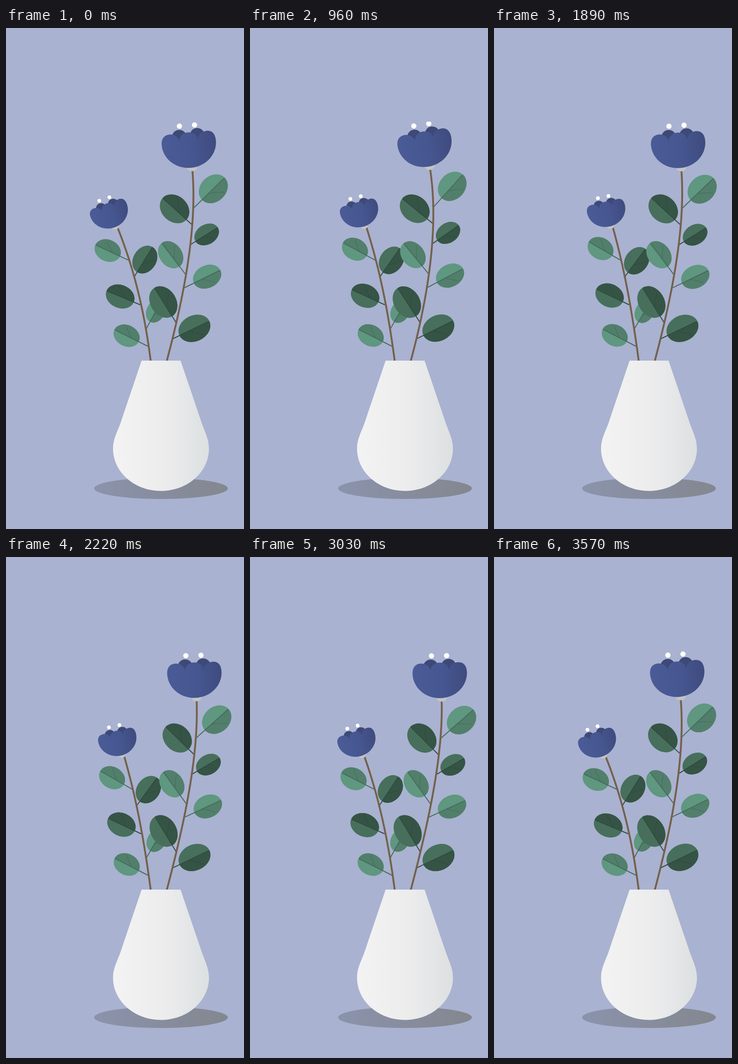
Recreate the animation shown at these times as an HTML page. Size 516x1086 px, loop 3600 ms.

```html
<!DOCTYPE html>
<html lang="en">
<head>
<meta charset="utf-8">
<title>Flowers in a vase</title>
<style>
html, body { margin: 0; height: 100%; overflow: hidden; background: #a9b2d0; }
svg { display: block; width: 100vw; height: 100vh; }
</style>
</head>
<body>
<svg viewBox="0 0 516 1086">
  <defs>
    <linearGradient id="petal"><stop stop-color="#4a5b97"/><stop offset=".55" stop-color="#465690"/><stop offset="1" stop-color="#3f4b7f"/></linearGradient>
    <linearGradient id="vase"><stop stop-color="#f3f3f4"/><stop offset=".55" stop-color="#ececed"/><stop offset="1" stop-color="#dce0e1"/></linearGradient>
    <linearGradient id="shade"><stop stop-color="#8b93ac"/><stop offset="1" stop-color="#83878f"/></linearGradient>
    <clipPath id="crop"><path d="M0 203H516V1086H0Z"/></clipPath>
  </defs>
  <ellipse cx="336" cy="998" rx="145" ry="23" fill="url(#shade)"/>
  <g id="left"></g>
  <g id="right" clip-path="url(#crop)"></g>
  <path fill="url(#vase)" d="M294 721H378.5L425 858C434 882 440 893 440 912C440 962 394 1003.5 336 1003.5S232 962 232 912C232 893 239 880 247 860Z"/>
</svg>
<script>
const LOOP = 3600, BEND_Y = 700;
const tones = {
  light: { base: '#5f9780', half: '#527f6b', rib: '#426d5a' },
  dark: { base: '#476f5c', half: '#355445', rib: '#2f4c3e' }
};

// Leaves: centre x, y, stalk foot x, y, half length, half width, tone
const branches = [
  {
    id: 'left', foot: 314, lean: -.19,
    stem: [[314, 724], [301, 620], [279, 525], [242, 433]],
    flower: { x: 226.3, y: 406.4, tilt: -19, size: .71 },
    leaves: [
      [325, 613, 303, 654, 27, 20, 'light'],
      [261.5, 667, 308, 690, 29.5, 23, 'light'],
      [247.5, 582, 291, 600, 32, 25, 'dark'],
      [301, 502, 277, 541, 32, 25, 'dark'],
      [220.5, 482.5, 267, 504, 29.5, 23.5, 'light']
    ],
    // steady at the outer end, eased at the inner one
    bend(t) {
      const p = 1 - Math.abs(1 - 2 * t);
      return 2.17e-4 * (p + p * p - p * p * p);
    }
  },
  {
    id: 'right', foot: 348, lean: .03,
    stem: [[348, 724], [381, 600], [416, 440], [404, 306]],
    flower: { x: 397.5, y: 264.7, tilt: -4.4, size: 1 },
    leaves: [
      [408.5, 651, 361, 674, 36, 28, 'dark'],
      [341, 594, 369, 639, 36.5, 28, 'dark'],
      [436, 539, 387, 563, 32, 24.5, 'light'],
      [357, 491.5, 390, 535, 32, 24.5, 'light'],
      [435, 447.5, 401, 469, 28.5, 21.5, 'dark'],
      [365.5, 392, 404, 427, 35, 28, 'dark'],
      [449.5, 348.5, 406, 391, 34.5, 28, 'light']
    ],
    bend: t => -8.9e-5 * Math.sin(2 * Math.PI * t)
  }
];

function leafSvg([x, y, fx, fy, a, b, tone]) {
  const { base, half, rib } = tones[tone];
  const stalk = Math.hypot(x - fx, y - fy);
  return `<g><ellipse rx="${a}" ry="${b}" fill="${base}"/>
    <path d="M${-a} 0A${a} ${b} 0 0 0 ${a} 0Z" fill="${half}"/>
    <g stroke="${rib}" fill="none"><path d="M${-stalk} 0H${a * .96}" stroke-width="2"/>
    <path d="M${-.4 * a} 0Q${-.05 * a} ${.3 * b} ${.32 * a} ${.78 * b}" stroke-width="1.4" opacity=".8"/></g></g>`;
}

const flowerSvg = `<g><ellipse cx="3.5" cy="37.5" rx="11" ry="8.5" fill="#c3c4c5"/>
  <g fill="#3d4977"><circle cx="-19.5" cy="-29.5" r="16"/><circle cx="19.5" cy="-30.5" r="16"/></g>
  <path fill="url(#petal)" d="M-59-16C-59-30-51-37-40-37C-30-37-22-31-20-22C-18-33-10-38.5 0-38.5S19-33 20-22C22-32 30-39 41-39C53-39 59-30 59-16C59 14 33 38.5 0 38.5S-59 14-59-16Z"/>
  <g fill="#fff"><circle cx="-17.5" cy="-53.5" r="5.7"/><circle cx="15.3" cy="-53.5" r="5.7"/></g></g>`;

// Curve a point of the branch around its leaning axis
function warp(br, k, x, y) {
  const h = Math.max(0, BEND_Y - y);
  const turn = 2 * k * h;
  const u = x - br.foot - br.lean * h;
  return {
    x: x + k * h * h + u * (Math.cos(turn) - 1),
    y: y + u * Math.sin(turn) + k * k * h ** 3,
    deg: turn * 180 / Math.PI
  };
}

function bezier(pts, s) {
  const r = 1 - s, w = [r * r * r, 3 * r * r * s, 3 * r * s * s, s * s * s];
  return [0, 1].map(i => pts.reduce((sum, p, n) => sum + p[i] * w[n], 0));
}

for (const br of branches) {
  const g = document.getElementById(br.id);
  g.innerHTML = br.leaves.map(leafSvg).join('') +
    '<path fill="none" stroke="#75604c" stroke-width="4"/>' + flowerSvg;
  const nodes = [...g.children];
  br.bloom = nodes.pop();
  br.stalk = nodes.pop();
  br.parts = nodes.map((node, i) => {
    const [x, y, fx, fy] = br.leaves[i];
    return { node, x, y, tilt: Math.atan2(y - fy, x - fx) * 180 / Math.PI, size: 1 };
  });
  br.parts.push({ node: br.bloom, ...br.flower });
  br.curve = Array.from({ length: 25 }, (_, i) => bezier(br.stem, i / 24));
}

function draw(now) {
  const t = now % LOOP / LOOP;
  for (const br of branches) {
    const k = br.bend(t);
    for (const { node, x, y, tilt, size } of br.parts) {
      const p = warp(br, k, x, y);
      node.setAttribute('transform', `translate(${p.x} ${p.y}) rotate(${tilt + p.deg}) scale(${size})`);
    }
    br.stalk.setAttribute('d', 'M' + br.curve.map(([x, y]) => {
      const p = warp(br, k, x, y);
      return p.x + ' ' + p.y;
    }).join('L'));
  }
}

const start = performance.now();
function tick() {
  draw(performance.now() - start);
  requestAnimationFrame(tick);
}
tick();
</script>
</body>
</html>
```
